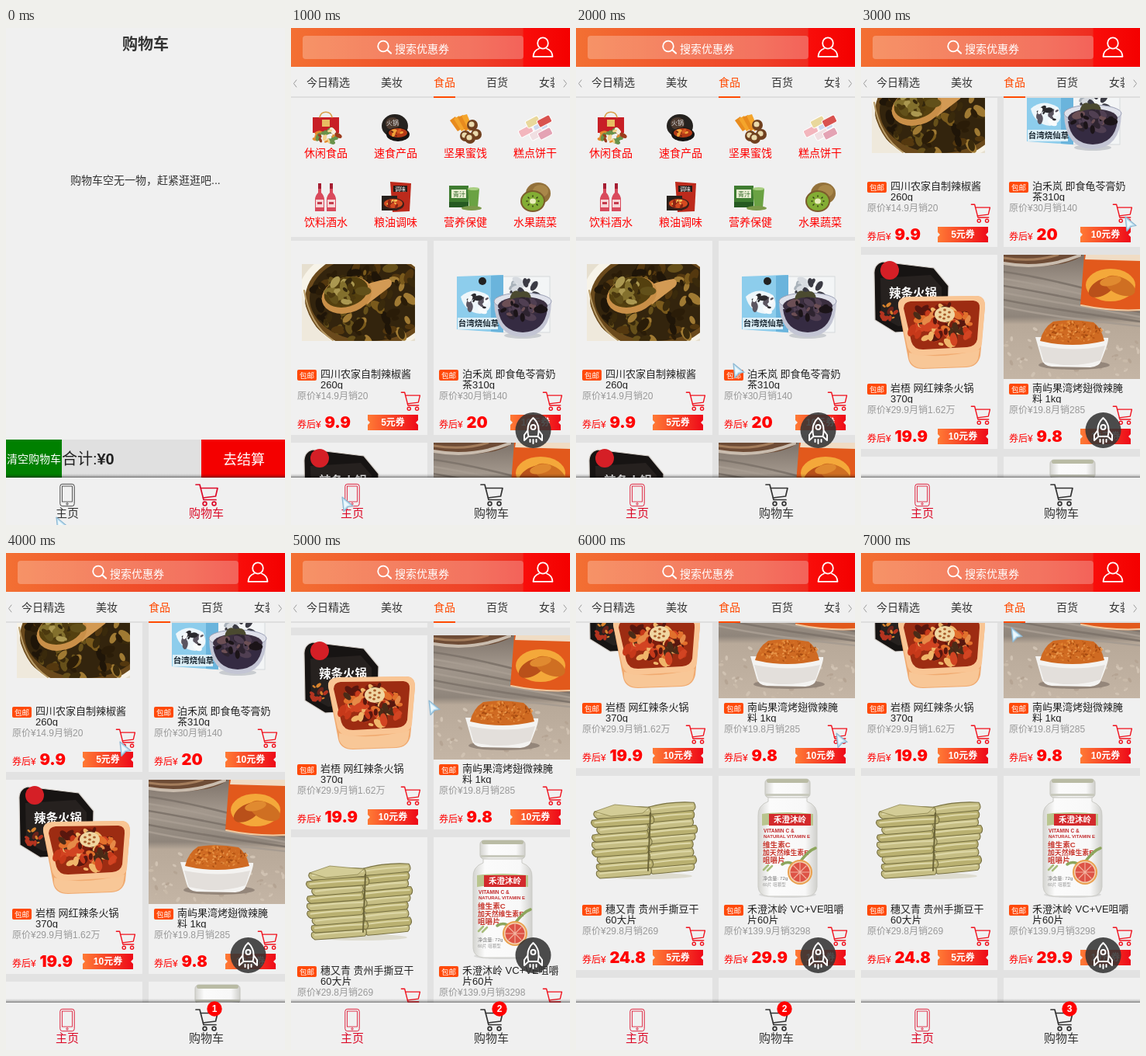
These frames come from a looping animation (360x640 px, 8000 ms). An HTML page:

```html
<!DOCTYPE html>
<html lang="zh-CN">
<head>
<meta charset="utf-8">
<title>购物车</title>
<style>
html, body { margin: 0; width: 100%; height: 100%; overflow: hidden; background: #f0f0f0; }
#stage { display: block; width: 360px; height: 640px; font-family: "Liberation Sans", "Noto Sans CJK SC", "Noto Sans CJK", sans-serif; }
.price { font-family: Inter, "DejaVu Sans", sans-serif; font-weight: 900; }
</style>
</head>
<body>
<svg id="stage" viewBox="0 0 360 640" xmlns="http://www.w3.org/2000/svg"></svg>
<script>
const at = (x, y, body, s = 1) => `<g transform="translate(${x} ${y}) scale(${s})">${body}</g>`;
const rect = (x, y, w, h, fill, more = '') => `<rect x="${x}" y="${y}" width="${w}" height="${h}" fill="${fill}" ${more}/>`;
const oval = (x, y, rx, ry, fill, more = '') => `<ellipse cx="${x}" cy="${y}" rx="${rx}" ry="${ry}" fill="${fill}" ${more}/>`;
const path = (d, fill, more = '') => `<path d="${d}" fill="${fill}" ${more}/>`;
const line = (d, color, w) => path(d, 'none', `stroke="${color}" stroke-width="${w}" stroke-linecap="round" stroke-linejoin="round"`);
const text = (s, x, cy, size, fill, more = '') =>
  `<text x="${x}" y="${(cy + size * 0.37).toFixed(2)}" font-size="${size}" fill="${fill}" ${more}>${s}</text>`;
const MID = 'text-anchor="middle"', BOLD = 'font-weight="700"';
const frame = (x, y, w, h, body) => `<svg x="${x}" y="${y}" width="${w}" height="${h}">${body}</svg>`;
const grad = (id, stops, dir = 'x2="1" y2="0"') =>
  `<linearGradient id="${id}" ${dir}>${stops.map(([o, c, a = 1]) => `<stop offset="${o}" stop-color="${c}" stop-opacity="${a}"/>`).join('')}</linearGradient>`;

function random(seed) {
  return () => (seed = (seed * 16807) % 2147483647) / 2147483647;
}

// Scattered morsels inside an ellipse
function bits(n, seed, cx, cy, rx, ry, size, colors) {
  const r = random(seed * 7919);
  let out = '';
  for (let i = 0; i < n; i++) {
    const a = r() * 6.283, d = Math.sqrt(r());
    const x = cx + Math.cos(a) * d * rx, y = cy + Math.sin(a) * d * ry;
    const w = size * (0.5 + r()), turn = r() * 180;
    out += oval(x.toFixed(1), y.toFixed(1), w.toFixed(1), (w * 0.55).toFixed(1), colors[Math.floor(r() * colors.length)],
      `transform="rotate(${turn.toFixed(0)} ${x.toFixed(1)} ${y.toFixed(1)})"`);
  }
  return out;
}

// Icons
const cart = (c, w) => line('M1 1.5H6L11 21H27M7 6H29L26.5 16.5L10 18.5', c, w) +
  [12.5, 24.5].map(x => oval(x, 26, 2.4, 2.4, 'none', `stroke="${c}" stroke-width="${w}"`)).join('');
const phone = c => rect(0.8, 0.8, 18.4, 28.4, 'none', `rx="3" stroke="${c}" stroke-width=".9"`) +
  rect(3.5, 3.5, 13, 20, 'none', `stroke="${c}" stroke-width=".8"`) + oval(10, 26.3, 1.2, 1.2, 'none', `stroke="${c}" stroke-width=".8"`);
const rocket = oval(0, 0, 23, 23, '#333', 'fill-opacity=".87"') +
  line('M0 -16C8 -9 8 0 6 8H-6C-8 0 -8 -9 0 -16ZM-7 0L-11.5 6V13L-6 8M7 0L11.5 6V13L6 8M-4 12V15M0 12V17M4 12V15', '#fff', 2) +
  oval(0, -4, 3, 3, 'none', 'stroke="#fff" stroke-width="2"');

// Category pictures, 40 by 40 around the centre
const gift = rect(-17, -14, 34, 20, '#c81f26') + line('M-8 -14C-6 -23 6 -23 8 -14', '#d9a04a', 1.5) +
  rect(-5, -11, 10, 9, '#e8bd62') + bits(24, 3, 0, 10, 18, 8, 4, ['#e58c2e', '#f3d28c', '#9d3b1d', '#f5efe0', '#69924a']);
const pot = oval(-1, -3, 17, 15, '#25221f') + oval(-4, -6, 9, 8, '#4d3b30') + text('火锅', -4, -7, 8, '#ddd', MID) +
  oval(3, 8, 15, 9, '#161312') + oval(3, 6, 12, 6, '#b53a17') + bits(12, 8, 3, 6, 9, 4, 2.5, ['#f0a33a', '#d95a22', '#6d2712']);
const nuts = [0, 1, 2, 3].map(i => path(`M${-20 + i * 5} ${-10 - i * 2}L${-13 + i * 5} ${-15 - i}L${-5 + i * 5} 1L${-10 + i * 5} 4Z`, i % 2 ? '#f4a52c' : '#e88b1e')).join('') +
  [[0, 10], [9, -4], [14, 8], [6, 13]].map(([x, y]) => oval(x, y, 7, 7, '#70401f') + oval(x - 1, y - 1, 3.6, 3.6, '#ead9ac')).join('');
const cakes = [['#f3b6bd', -12, 4], ['#e9d89c', -3, -8], ['#cfd9ee', 7, -2], ['#d9524f', 12, -9], ['#f1dfe2', 2, 8], ['#e4a3b4', 13, 7]]
  .map(([c, x, y]) => rect(x - 9, y - 5, 18, 10, c, `rx="2" stroke="#fff" transform="rotate(-28 ${x} ${y})"`)).join('');
const wine = [-8, 7].map(x => path(`M${x - 2} -18H${x + 2}V-6Q${x + 6} -2 ${x + 6} 3V18H${x - 6}V3Q${x - 6} -2 ${x - 2} -6Z`, '#d94a5c') +
  rect(x - 2, -18, 4, 7, '#a51e32') + rect(x - 5, 3, 10, 10, '#f6d7d8') + rect(x - 3, 6, 6, 3, '#c43b4c')).join('');
const spice = path('M-7 -20L20 -18L18 18L-4 19Z', '#bd2a1c') + rect(-3, -15, 18, 8, '#251b18') + text('调味', 6, -11, 7, '#fff', MID) +
  rect(-18, -2, 20, 19, '#26201c') + oval(-3, 9, 14, 8, '#3a201a') + oval(-3, 8, 12, 6, '#d44a20') + bits(10, 6, -3, 8, 9, 4, 2.4, ['#f2c65a', '#8c2415']);
const juice = rect(-21, -15, 25, 28, '#3f7c31') + rect(-18, -10, 19, 11, '#e8edd0') + text('青汁', -8, -4, 8, '#2f6625', MID) +
  rect(-21, 6, 25, 7, '#265a22') + path('M3 -11H18L16 13H5Z', '#6aa243') + oval(10.5, -11, 7.5, 2, '#a9cf82') + oval(8, 14, 13, 3, '#7c9a4a');
const kiwi = oval(4, -5, 16, 14, '#93713a') + oval(7, -8, 10, 8, '#a98749') + oval(-3, 5, 16, 14, '#7b5c2c') + oval(-3, 5, 14, 12, '#83ad34') +
  oval(-3, 5, 4, 3.5, '#e9edbb') + line('M-3 -2V-1M3 0L2 1M5 5H4M3 10L2 9M-3 12V11M-9 10L-8 9M-11 5H-10M-9 0L-8 1', '#2f3315', 1.4);

// Product pictures
const sauce = frame(14, 30, 146, 99, rect(0, 0, 146, 99, '#e6dfcf') +
  oval(86, 44, 92, 68, '#f7f3e8') + oval(86, 46, 82, 62, '#6b4a1c') + oval(88, 44, 78, 55, '#33240d') +
  bits(120, 5, 88, 50, 74, 50, 7, ['#54380f', '#1f1508', '#7a5a1c', '#a07a33', '#3a2a0c', '#2a1c08', '#66501a']) +
  path('M70 32Q90 22 112 19Q119 22 114 29L84 52Z', '#d39a54') +
  oval(58, 40, 33, 23, '#c98f48', 'transform="rotate(-16 58 40)"') + oval(57, 36, 29, 19, '#54400f', 'transform="rotate(-16 57 36)"') +
  bits(26, 4, 56, 34, 24, 16, 7, ['#83702d', '#ab9851', '#4c390f', '#62501a', '#33260c']) +
  path('M0 34Q8 80 38 99H0Z', '#efe9dc') + line('M3 34Q10 78 40 98', '#b79a66', 2));

const jelly = rect(88, 46, 62, 72, '#f3f5f6', 'stroke="#d5d9dc"') + bits(16, 9, 122, 62, 22, 14, 5, ['#d7dbe0', '#3b3b44', '#a9b2ba']) +
  path('M30 46L88 44V118L30 114Z', '#8dcdec') + path('M74 45L90 44V118L74 117Z', '#6ab4dc') + oval(63, 52, 5, 5, '#222') +
  path('M35 72Q50 58 70 70Q80 90 60 94Q40 92 35 72Z', '#eef6fa') + bits(14, 2, 58, 80, 17, 11, 4.5, ['#2b2a2e', '#5b5560', '#f8fbfc']) +
  rect(31, 99, 52, 15, '#dceff8') + text('台湾烧仙草', 58, 106, 10.5, '#17242e', MID + ' ' + BOLD) +
  oval(115, 122, 24, 4, '#c9ccd0') + path('M78 78Q79 123 115 124Q151 123 152 78Z', '#c3c5d4') + path('M83 88Q87 117 115 118Q143 117 147 88Z', '#352b42') +
  oval(115, 78, 37, 11, '#dfe1ea', 'stroke="#9a9fb4"') + oval(115, 84, 32, 12, '#3b2f40') +
  bits(28, 12, 115, 87, 27, 12, 6, ['#1b1418', '#503f52', '#6c4f55', '#2e2430']) + path('M98 76Q101 60 112 66Q124 62 126 74Q112 70 98 76Z', '#4b4a30');

const hotpot = path('M17 26Q16 12 28 9L94 17L113 40L112 88Q111 97 100 97L44 100L18 84Z', '#171413', 'stroke="#d8d2cc" stroke-width="1.2"') +
  path('M25 30L90 26L104 42V86L48 92L26 80Z', '#26211f') + oval(37, 20, 12, 12, '#d51f26') +
  text('辣条火锅', 67, 49, 15.5, '#fff', MID + ' ' + BOLD) + bits(10, 14, 36, 74, 10, 12, 4, ['#b43420', '#d8832d', '#6c241a']) +
  path('M48 66Q47 56 60 55L148 53Q160 53 160 66L154 130Q151 144 136 145L80 147Q64 147 61 134Z', '#f0aa70') +
  path('M62 126Q100 136 153 122L151 134Q148 143 136 144L80 146Q66 146 62 134Z', '#f8c797') +
  path('M48 66Q47 55 60 54L148 53Q160 53 160 66L156 114Q154 125 141 126L78 130Q64 130 60 119Z', '#f9c594') +
  path('M55 69Q55 61 64 60L145 59Q154 60 153 69L150 109Q148 118 137 119L80 122Q68 122 65 112Z', '#9d2c12') +
  bits(110, 21, 104, 90, 41, 26, 6, ['#c7391a', '#7d1d0e', '#e2702c', '#f0b56a', '#59170e', '#d24422', '#4a2b17', '#e68a48']) +
  oval(108, 77, 13, 10, '#f0d6a2') + [[102, 74], [108, 71], [114, 74], [113, 80], [107, 82], [102, 80], [108, 77]].map(([x, y]) => oval(x, y, 1.9, 1.6, '#a95c2b')).join('');

const powder = rect(0, 0, 176, 160, 'url(#cloth)') +
  [0, 1, 2, 3, 4, 5].map(i => line(`M0 ${22 + i * 9}Q60 ${30 + i * 10} 176 ${62 + i * 6}`, i % 2 ? '#a79c91' : '#7f756c', 2.5)).join('') +
  bits(90, 33, 88, 128, 96, 38, 2.5, ['#c9baa9', '#b5a493', '#d0c2b2']) +
  path('M0 0H102Q90 12 48 15Q20 16 0 10Z', '#6e4c36') + line('M0 11Q50 20 98 1', '#c9bcae', 4) + line('M0 4Q40 10 70 0', '#a47d5c', 3) +
  path('M104 0H176V72Q138 74 99 65Z', '#e2591c') + path('M106 0H176V8L105 6Z', '#f0dcc4') + oval(138, 39, 32, 21, '#f4a83a') +
  oval(127, 42, 19, 10, '#b9501a', 'transform="rotate(-30 127 42)"') + oval(150, 40, 21, 11, '#cf6f22', 'transform="rotate(24 150 40)"') +
  oval(138, 34, 14, 6, '#e08a30', 'transform="rotate(-12 138 34)"') + line('M100 65Q138 73 176 71', '#f0c9a0', 2) +
  oval(91, 142, 46, 6, '#94867a') +
  path('M41 106L135 107Q136 112 126 136Q124 144 112 145L62 144Q51 143 49 134Z', '#f4f3f1') + path('M46 117Q90 126 131 117L125 136Q90 147 52 138Z', '#e3dfdb') +
  path('M47 111Q51 94 64 86Q88 82 116 87Q126 94 130 111Q89 121 47 111Z', '#cf6a22') +
  bits(130, 17, 90, 99, 37, 13, 1.7, ['#e08432', '#b95715', '#e8964a', '#a84c12', '#d6752a']);

function stack(x, w, top, seed) {
  const r = random(seed);
  let out = '';
  for (let i = 8; i >= 0; i--) {
    const a = x + (r() - 0.5) * 9, y = top + i * 9.6 + r() * 2, b = x + w + (r() - 0.5) * 9, m = (a + b) / 2;
    out += path(`M${a} ${y + 6}Q${m} ${y - 2} ${b} ${y}Q${b + 4} ${y + 6} ${b} ${y + 10}Q${m} ${y + 13} ${a + 4} ${y + 15}Q${a - 3} ${y + 11} ${a} ${y + 6}Z`,
      i % 2 ? '#b9b070' : '#c6be84', 'stroke="#777041" stroke-width="1.1"') + line(`M${a + 4} ${y + 9}Q${m} ${y + 5} ${b - 2} ${y + 4}`, '#dcd6a6', 2.2);
  }
  return out;
}
const tofu = oval(90, 129, 60, 4, '#dedcd0') + stack(94, 58, 34, 80123) + stack(25, 70, 40, 92377) +
  path('M24 46L50 37L94 41L86 48L45 52Z', '#d3cc96', 'stroke="#8d8650" stroke-width=".8"') + line('M96 48L93 122', '#6b6438', 2);

const bottle = oval(89, 153, 37, 4, '#d9d9d9') +
  rect(60, 4, 58, 24, 'url(#glass)', 'rx="5" stroke="#c4c4bc"') + rect(62, 4, 54, 5, '#b9bba4', 'rx="2.5"') + rect(61, 23, 56, 3, '#c8c9bd') +
  path('M64 28H114V33Q128 38 127 52V143Q126 154 114 155H64Q52 154 51 143V52Q50 38 64 33Z', 'url(#glass)', 'stroke="#cbcbc6"') +
  path('M56 49Q89 45 122 49V64Q89 60 56 64Z', '#b9c58e') + rect(65, 49, 54, 15, '#d32a2c') + text('禾澄沐岭', 92, 56.5, 10.5, '#fff', MID + ' ' + BOLD) +
  text('VITAMIN C &amp;', 58, 71, 6.6, '#c22a2c', BOLD) + text('NATURAL VITAMIN E', 58, 78, 6, '#c22a2c', BOLD) +
  text('维生素C', 57, 88, 9.6, '#c93a31', BOLD) + text('加天然维生素E', 57, 98.5, 8.9, '#c93a31', BOLD) + text('咀嚼片', 57, 108.5, 9.6, '#c93a31', BOLD) +
  line('M104 112Q116 96 125 93M100 116Q90 108 82 114', '#8da65d', 3.5) +
  oval(105, 124, 16, 16, '#e9a04f') + oval(105, 124, 14, 14, '#f5d2b2') + oval(105, 124, 12.5, 12.5, '#dd5346') +
  line('M105 112V136M93 124H117M97 116L113 132M113 116L97 132', '#f3b3a0', 1.1) +
  line('M58 121L64 115M63 122L69 116', '#a8bd7c', 2.5) + text('净含量: 72g', 57, 132, 6.2, '#777') + text('60片 咀嚼型', 57, 140, 5.5, '#999');

const goods = [
  [sauce, '四川农家自制辣椒酱', '260g', '14.9', '20', '9.9', 5],
  [jelly, '泊禾岚 即食龟苓膏奶', '茶310g', '30', '140', '20', 10],
  [hotpot, '岩梧 网红辣条火锅', '370g', '29.9', '1.62万', '19.9', 10],
  [powder, '南屿果湾烤翅微辣腌', '料 1kg', '19.8', '285', '9.8', 10],
  [tofu, '穗又青 贵州手撕豆干', '60大片', '29.8', '269', '24.8', 5],
  [bottle, '禾澄沐岭 VC+VE咀嚼', '片60片', '139.9', '3298', '29.9', 10],
  [''], ['']
];

function card([pic, name, rest, old, sold, price, off], i) {
  const right = i % 2, dx = right ? -1 : 0;
  const info = !name ? '' : at(dx, 0,
    rect(8, 166, 25, 14, '#ff4a0a', 'rx="2"') + text('包邮', 20.5, 173, 9.5, '#fff', MID) +
    frame(37, 162, 140, 29, text(name, 1, 9, 13, '#222') + text(rest, 1, 23, 13, '#222')) +
    text(`原价¥${old}月销${sold}`, 8, 200, 12, '#999') + at(141.5, 194, cart('#f0101c', 1.6), 0.86) +
    text('券后¥', 8, 237, 12, '#f00') + text(price, 43.5, 233.5, 20, '#f00', 'class="price"') +
    at(right + 99, 224, path('M0 0H65V7L62 10L65 13V20H0V13L3 10L0 7Z', 'url(#ticket)') + text(off + '元券', 32.5, 10, 12, '#fff', MID + ' ' + BOLD)));
  return at(right * 184, 274 + (i >> 1) * 260, rect(0, 0, 176, 250, '#f0f0f0') + frame(0, 0, 176, 160, pic) + info);
}

const groups = [['休闲食品', gift], ['速食产品', pot], ['坚果蜜饯', nuts], ['糕点饼干', cakes],
  ['饮料酒水', wine], ['粮油调味', spice], ['营养保健', juice], ['水果蔬菜', kiwi]];

const list = rect(0, 90, 360, 1400, '#e2e2e2') + rect(0, 90, 360, 179, '#f0f0f0') +
  groups.map(([name, pic], i) => {
    const x = 45 + (i % 4) * 90, y = (i >> 2) * 89;
    return at(x, 129 + y, pic) + text(name, x, 161 + y, 14, '#f00', MID);
  }).join('') + goods.map(card).join('');

const tabs = ['今日精选', '美妆', '食品', '百货', '女装'];
const header = rect(0, 0, 360, 50, 'url(#head)') + rect(15, 10, 285, 30, '#fff', 'rx="4" fill-opacity=".26"') +
  oval(119, 23.5, 6.8, 6.8, 'none', 'stroke="#fff" stroke-width="1.8"') + line('M124.5 28.5L129 32.5', '#fff', 2.2) + text('搜索优惠券', 134, 27, 14, '#fff') +
  oval(325, 19.5, 6.8, 7.2, 'none', 'stroke="#fff" stroke-width="1.8"') + line('M320 26.5Q313 29 312.5 36.8H337.5Q337 29 330 26.5', '#fff', 1.8) +
  rect(0, 50, 360, 40, '#f0f0f0') + rect(0, 88, 360, 2, '#dedede') +
  frame(20, 50, 320, 38, tabs.map((s, i) => text(s, i ? 28 + i * 68 : 0, 20, 14, i == 2 ? '#ff4a00' : '#333')).join('')) +
  rect(184, 88, 28, 2, '#ff4a00') + line('M7 67L3.5 71.5L7 76M352 67L355.5 71.5L352 76', '#999', 1);

const basket = rect(0, 0, 360, 640, '#f0f0f0') + text('购物车', 180, 21, 20, '#333', MID + ' ' + BOLD) +
  text('购物车空无一物，赶紧逛逛吧...', 83, 196, 14, '#333') +
  rect(0, 530, 72, 49, '#008000') + rect(72, 530, 180, 49, '#e0e0e0') + rect(252, 530, 108, 49, '#f40000') +
  text('清空购物车', 36, 555, 14, '#fff', MID) + text('合计:', 72, 555, 20, '#222') + text('¥0', 117.5, 555, 20, '#222', BOLD) +
  text('去结算', 307, 555, 18, '#fff', MID);

const bar = (a, b) => at(69, 586.5, phone(a)) + text('主页', 79, 624, 15, a, MID) + at(244, 586.5, cart(b, 1.7)) + text('购物车', 258.5, 624, 15, b, MID);
const RED = '#dc0a28', INK = '#333';

document.getElementById('stage').innerHTML =
  '<defs>' + grad('head', [[0, '#f37033'], [0.35, '#f0552b'], [0.65, '#ef4228'], [0.83, '#ee2c20'], [0.835, '#f90d0a'], [1, '#f40000']]) +
  grad('ticket', [[0, '#ff7a35'], [1, '#ee0a18']]) + grad('glass', [[0, '#d4d4d0'], [0.2, '#fbfbfb'], [0.8, '#f8f8f8'], [1, '#cfcfcb']]) +
  grad('cloth', [[0, '#7d7269'], [0.25, '#a3988d'], [0.5, '#8f857b'], [0.56, '#b8a999'], [1, '#c4b5a5']], 'x2="0" y2="1"') +
  grad('shade', [[0, '#000', 0], [0.5, '#000', 0.15], [1, '#000', 0.48]], 'x2="0" y2="1"') + '</defs>' +
  `<g id="home"><g id="list">${list}</g>${header}${at(312.5, 518, rocket)}</g><g id="basket">${basket}</g>` +
  rect(0, 574, 360, 5, 'url(#shade)') + rect(0, 579, 360, 61, '#f0f0f0') +
  `<g id="barHome">${bar(RED, INK)}</g><g id="barCart">${bar(INK, RED)}</g>` +
  `<g id="badge">${oval(269, 587, 9.7, 9.7, '#f00')}<text id="count" x="269" y="591.3" font-size="12" fill="#fff" ${MID} ${BOLD}></text></g>` +
  `<g id="cursor">${path('M0 0L14 11.5L7.5 12.5L2 18.5Z', '#c3e4f4', 'stroke="#8db7d2" stroke-width="1.2" stroke-linejoin="round"')}${path('M2 4L9.5 10.3L6.2 11L3 14.5Z', '#eef8fc')}</g>`;

// One step per second: page, scroll, items in cart, pointer
const steps = [
  ['cart', 0, 0, 65, 630],
  ['home', 0, 0, 66, 604],
  ['home', 0, 0, 203, 432],
  ['home', 242, 0, 341, 243],
  ['home', 242, 1, 147, 243],
  ['home', 428, 2, 178, 190],
  ['home', 507, 2, 336, 232],
  ['home', 507, 3, 194, 96]
];
const el = id => document.getElementById(id);
const show = (id, on) => el(id).setAttribute('visibility', on ? 'visible' : 'hidden');
let last = -1;

function update(ms) {
  const n = Math.floor(ms / 1000) % steps.length;
  if (n === last) return;
  last = n;
  const [page, scroll, items, x, y] = steps[n], home = page === 'home';
  show('home', home);
  show('barHome', home);
  show('basket', !home);
  show('barCart', !home);
  show('badge', items > 0);
  el('count').textContent = items || '';
  el('list').setAttribute('transform', `translate(0 ${-scroll})`);
  el('cursor').setAttribute('transform', `translate(${x} ${y})`);
}

const start = performance.now();
function tick() {
  update(performance.now() - start);
  requestAnimationFrame(tick);
}
tick();
</script>
</body>
</html>
```
